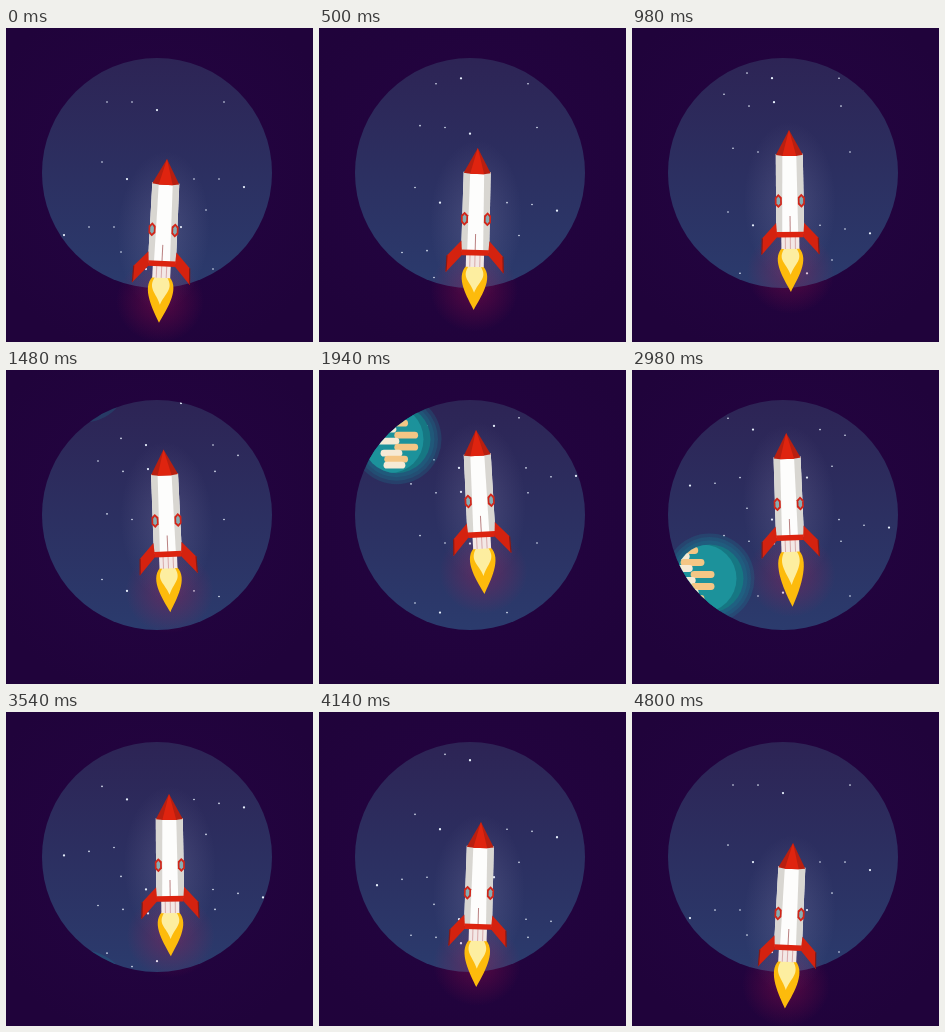
An HTML page with a canvas that plays this animation: 307 px wide and 314 px high, repeating every 4820 ms.

```html
<!DOCTYPE html>
<html lang="en">
<head>
<meta charset="utf-8">
<title>Rocket</title>
<style>
  html, body { margin: 0; width: 100%; height: 100%; overflow: hidden; background: #20033b; }
  canvas { display: block; width: 307px; height: 314px; }
</style>
</head>
<body>
<canvas id="stage" width="307" height="314"></canvas>
<script>
const ctx = document.getElementById('stage').getContext('2d');
const LOOP = 4820, TAU = Math.PI * 2;

// Flight path of the nose: time, x, y
const path = [[0, 161, 131], [980, 157, 102], [1940, 157, 60],
  [2500, 148, 52], [3540, 163, 82], [4140, 162, 110]];

// Rows of stars 25 px apart; the last one is bright and hangs lower
const stars = [];
function starRow(x, y, dir, count, drop) {
  for (let i = 0; i < count; i++) {
    const last = i === count - 1;
    stars.push({ x: x + 25 * i * dir, y: y + (last ? drop : 0), bright: last, main: (count - i) % 2 });
  }
}
for (const [x, y, dir] of [[96, 134, 1], [200, 182, -1], [115, 224, 1]]) {
  starRow(x, y, dir, 2, 17);
  starRow(x + 92 * dir, y + 17, dir, 3, 8);
}
for (const [x, y] of [[101, 74], [92, 257]]) {
  starRow(x, y, 1, 3, 8);
  stars.push({ x: x + 117, y });
}

// Smooth closed curve through the path points
function pathAt(t) {
  const n = path.length;
  const key = i => {
    const [time, x, y] = path[(i + n) % n];
    return [time + Math.floor(i / n) * LOOP, x, y];
  };
  let i = n - 1;
  while (path[i][0] > t) i--;
  const [a, b, c, d] = [i - 1, i, i + 1, i + 2].map(key);
  const span = c[0] - b[0], s = (t - b[0]) / span, r = 1 - s;
  return [1, 2].map(k => {
    const m0 = (c[k] - a[k]) / (c[0] - a[0]) * span;
    const m1 = (d[k] - b[k]) / (d[0] - b[0]) * span;
    return r * r * ((1 + 2 * s) * b[k] + s * m0) + s * s * ((3 - 2 * s) * c[k] - r * m1);
  });
}

function disc(x, y, r, fill) {
  ctx.beginPath();
  ctx.arc(x, y, r, 0, TAU);
  ctx.fillStyle = fill;
  ctx.fill();
}

function poly(fill, ...points) {
  ctx.beginPath();
  for (let i = 0; i < points.length; i += 2) ctx.lineTo(points[i], points[i + 1]);
  ctx.closePath();
  ctx.fillStyle = fill;
  ctx.fill();
}

function line(x1, y1, x2, y2, color, width) {
  ctx.beginPath();
  ctx.moveTo(x1, y1);
  ctx.lineTo(x2, y2);
  ctx.strokeStyle = color;
  ctx.lineWidth = width;
  ctx.stroke();
}

function glow(x, y, rx, ry, rgb, alpha) {
  ctx.save();
  ctx.translate(x, y);
  ctx.scale(rx, ry);
  const g = ctx.createRadialGradient(0, 0, 0, 0, 0, 1);
  g.addColorStop(0, `rgba(${rgb},${alpha})`);
  g.addColorStop(1, `rgba(${rgb},0)`);
  disc(0, 0, 1, g);
  ctx.restore();
}

function drawSky(t) {
  const sky = ctx.createLinearGradient(0, 30, 0, 260);
  sky.addColorStop(0, '#2d2455');
  sky.addColorStop(1, '#2b3b6d');
  disc(151, 145, 115, sky);
  ctx.clip();
  // Each star sinks out of view while its successor follows from above
  for (const { x, y, bright, main } of stars) {
    const [leave, enter] = main ? [0.0472, 0.0497] : [0.051, 0.0466];
    const r = bright ? 1.15 : 0.8;
    disc(x, y + leave * t, r, '#e4edfa');
    disc(x, y - enter * (LOOP - t), r, '#e4edfa');
  }
}

function drawPlanet(t) {
  ctx.save();
  ctx.translate(77.5, 69 + (t - 1940) * 0.134);
  for (const r of [45, 41.5, 38]) disc(0, 0, r, 'rgba(22,125,145,.24)');
  disc(0, 0, 34, '#167783');
  ctx.clip();
  disc(-7, 0, 34, '#1c929b');
  ctx.lineCap = 'round';
  const drift = (2500 - t) * 0.016;
  for (let i = 0; i < 10; i++) {
    const peach = i % 2 === 0, y = -28 + 6 * i;
    const right = drift + (peach ? 18 * Math.sin(Math.PI * i / 10) ** 2 - 7 : 1.5 * i - 17);
    line(right - (peach ? 17 : 15), y, right, y, peach ? '#f4c685' : '#f6ead5', 6.8);
  }
  ctx.restore();
}

function flame(top, tip, w, fill) {
  ctx.beginPath();
  ctx.moveTo(0, tip);
  ctx.bezierCurveTo(-w * 0.5, tip - 12, -w * 1.65, top + 12, -w * 0.7, top);
  ctx.lineTo(w * 0.7, top);
  ctx.bezierCurveTo(w * 1.65, top + 12, w * 0.5, tip - 12, 0, tip);
  ctx.fillStyle = fill;
  ctx.fill();
}

function hexagon(x, y, w, h, fill) {
  poly(fill, x, y - h, x + w, y - h / 2, x + w, y + h / 2, x, y + h, x - w, y + h / 2, x - w, y - h / 2);
}

function drawRocket(t) {
  const phase = TAU * t / LOOP;
  const tilt = 2.8 * Math.cos(phase) - 0.6 * Math.sin(phase) + 0.5 * Math.cos(2 * phase) - 0.5;
  const burn = 44 + 14 * Math.cos(5.5 * phase + 0.91) ** 4;
  ctx.save();
  ctx.translate(...pathAt(t));
  ctx.rotate(tilt * Math.PI / 180);
  glow(0, 72, 46, 80, '190,180,215', 0.18);
  glow(0, 142, 44, 42, '210,20,80', 0.3);

  flame(118, 118 + burn, 12, '#fdbb0c');
  flame(118, 118 + burn * 0.61, 8.3, '#fdeea0');

  poly('#f3e8e6', -9, 107, 9, 107, 9, 119, -9, 119);
  for (const x of [-5, 0, 5]) line(x, 107, x, 119, '#d8a9a9', 1);

  poly('#fdfdfc', -13.5, 24, 13.5, 24, 14, 104, -14, 104);
  for (const side of [-1, 1]) {
    poly('#d8d6d1', 13.5 * side, 24, 7 * side, 26, 8 * side, 104, 14 * side, 104);
    poly('#d4220f', 14 * side, 93, 28 * side, 108, 29 * side, 125, 13 * side, 107);
    line(28 * side, 108, 28.6 * side, 124, '#841a17', 1.2);
    hexagon(11.5 * side, 71, 3.5, 7, '#d1261a');
    hexagon(11.5 * side, 71, 1.8, 4.5, '#86aeb4');
  }
  line(0, 86, 0, 104, '#b98080', 1);
  poly('#dc230f', -14, 102, 14, 102, 13, 107.5, -13, 107.5);

  poly('#b81f10', 0, 0, -13.5, 25, -7, 26, 7, 26, 13.5, 25);
  poly('#df240f', 0, 0, -7, 26, 7, 26);
  ctx.restore();
}

function draw(t) {
  ctx.fillStyle = '#20033b';
  ctx.fillRect(0, 0, 307, 314);
  glow(151, 145, 190, 190, '48,6,84', 0.3);
  ctx.save();
  drawSky(t);
  drawPlanet(t);
  ctx.restore();
  drawRocket(t);
}

const start = performance.now();
function tick() {
  draw((performance.now() - start) % LOOP);
  requestAnimationFrame(tick);
}
tick();
</script>
</body>
</html>
```
